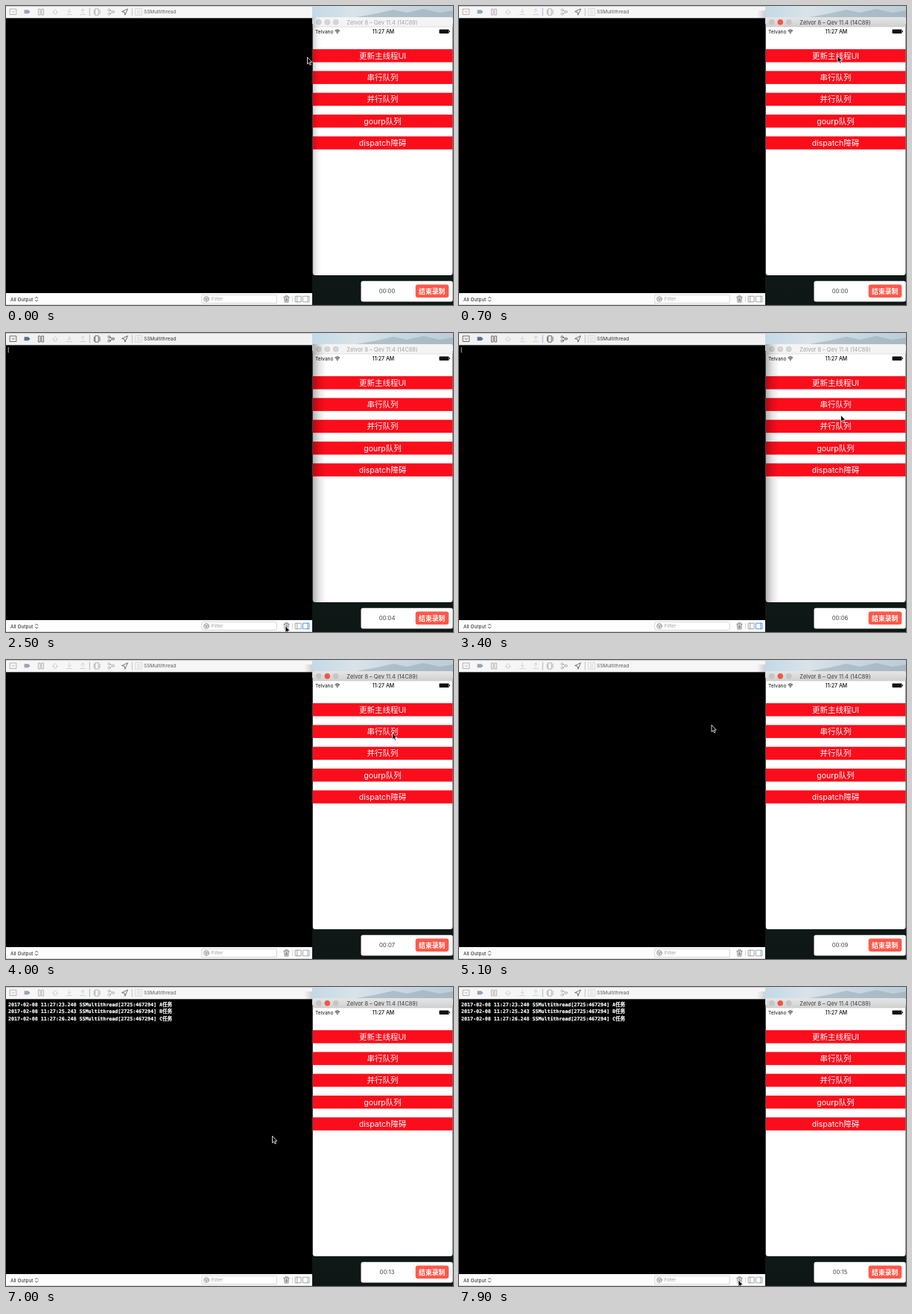
These frames come from a looping animation (600x402 px, 8000 ms). An HTML page:

```html
<!DOCTYPE html>
<html lang="zh-CN">
<head>
<meta charset="utf-8">
<title>Serial queue demo</title>
<style>
  html, body { margin: 0; width: 100%; height: 100%; overflow: hidden; background: #000; }
  svg { display: block; width: 600px; height: 402px; font-family: Inter, "Noto Sans CJK SC", "Noto Sans CJK", sans-serif; }
  .mid { text-anchor: middle; }
  .log { font: bold 6.62px "DejaVu Sans Mono", "Noto Sans CJK SC", "Noto Sans CJK", monospace; fill: #fff; stroke: #fff; stroke-width: .2; white-space: pre; }
  .line { fill: none; stroke-width: .8; stroke-linejoin: round; stroke-linecap: round; }
  .faint { stroke: #cbcbcb; }
  .tool { stroke: #a4a4a4; }
  .strong { stroke: #555; }
  .front .tool, .front .strong { stroke: #4c4c4c; }
</style>
</head>
<body>
<svg viewBox="0 0 600 402">
  <defs>
    <linearGradient id="sky">
      <stop offset="0" stop-color="#c3d9e6"/><stop offset=".3" stop-color="#d9e3e8"/>
      <stop offset=".6" stop-color="#c9d8e1"/><stop offset="1" stop-color="#bccdd8"/>
    </linearGradient>
    <linearGradient id="forest" x2="0" y2="1">
      <stop offset="0" stop-color="#17221f"/><stop offset="1" stop-color="#0e1715"/>
    </linearGradient>
    <linearGradient id="bar" x2="0" y2="1">
      <stop offset="0" stop-color="#e6e6e6"/><stop offset="1" stop-color="#d0d0d0"/>
    </linearGradient>
    <linearGradient id="shadeRight">
      <stop offset="0" stop-opacity=".3"/><stop offset=".5" stop-opacity=".1"/><stop offset="1" stop-opacity="0"/>
    </linearGradient>
    <linearGradient id="shadeLeft">
      <stop offset="0" stop-opacity="0"/><stop offset="1" stop-opacity=".16"/>
    </linearGradient>
  </defs>

  <!-- desktop -->
  <rect width="600" height="402" fill="url(#forest)"/>
  <rect x="411" width="189" height="24" fill="url(#sky)"/>
  <path d="M470 15L498 10 520 5 538 9 560 4 582 9 600 6V15Z" fill="#93a6b0" opacity=".5"/>

  <!-- phone window -->
  <g>
    <path d="M411.800 358.500V18.500q0-3.500 3.500-3.500H596q3.500 0 3.500 3.500V358.500q0 3.500-3.500 3.500H415.300q-3.500 0-3.500-3.500Z" fill="#fff"/>
    <path id="titleBar" d="M411.800 28V18.500q0-3.500 3.500-3.500H596q3.500 0 3.500 3.500V28Z"/>
    <path d="M411.800 28H599.500" stroke="#c2c2c2" stroke-width=".5"/>
    <g id="lights"></g>
    <text id="title" class="mid" x="505" y="24.700" font-size="7.400">Zelvor 8 – Qev 11.4 (14C89)</text>
    <text x="415" y="36.800" font-size="6.600" fill="#111">Telvano</text>
    <g fill="none" stroke="#111" stroke-width="1">
      <path d="M441.500 33.400q3.300-2.900 6.600 0M442.800 34.900q2-1.700 4 0"/>
      <circle cx="444.800" cy="36.200" r=".4"/>
    </g>
    <text class="mid" x="506.500" y="36.900" font-size="7" font-weight="500" fill="#111">11:27 AM</text>
    <rect x="581.500" y="31.500" width="13" height="5.400" rx="1" fill="#111"/>
    <rect x="595" y="33.200" width="1" height="2" fill="#111"/>
    <g id="buttons"></g>
    <rect id="editorShade" x="411.800" y="15" height="347" fill="url(#shadeRight)"/>
  </g>

  <!-- editor window -->
  <g id="editor">
    <rect width="411" height="402" fill="#000"/>
    <rect id="toolbar" width="411" height="16.400"/>
    <path d="M0 .4H411" stroke="#bdbdbd" stroke-width=".8"/>
    <path d="M0 16.800H411" stroke="#24322f" stroke-width=".8"/>
    <g class="line">
      <path class="tool" d="M5.500 4H13.800V11.500H5.500ZM8 7l1.700 1.700L11.400 7"/>
      <path id="tag" d="M24.500 5.300h5.500l2.500 2.500-2.500 2.500h-5.500Z"/>
      <path class="tool" d="M43.800 4h2.200v8h-2.200ZM48.200 4h2.200v8h-2.200Z"/>
      <g class="faint">
        <path d="M62.500 8.500l3.500-4 3.500 4h-2v2.500h-3v-2.500Z"/>
        <path d="M85 4v5M82.800 7L85 9.200 87.200 7M81.500 11.500h7"/>
        <path d="M103 9.200v-5M100.800 6.200L103 4l2.200 2.200M99.500 11.500h7"/>
      </g>
      <path d="M112.300 3V13" stroke="#9aa9bd"/>
      <path class="tool" d="M120 3.800h4.200v8.400H120ZM118.300 5.300v5.400M126 5.300v5.400"/>
      <g class="tool">
        <circle cx="138.400" cy="5.400" r="1.500"/><circle cx="143.800" cy="7.800" r="1.500"/><circle cx="138.400" cy="10.600" r="1.500"/>
        <path d="M139.800 6l2.600 1.200M139.800 10l2.600-1.400"/>
      </g>
      <path class="strong" d="M163 4l-7.500 3.600 3.500.7.700 3.500Z"/>
      <path d="M169.300 3V13" stroke="#b4b4b4"/>
      <path d="M173.800 3.500h8.600v8.800h-8.600ZM176 6h4M176 8h4M176 10h4" stroke="#d2d2d2"/>
    </g>
    <text id="project" x="185" y="10.200" font-size="6.500">SSMultithread</text>

    <g id="logs"></g>
    <path id="caret" d="M3.200 19V26.500" stroke="#ddd" stroke-width=".8"/>

    <rect y="386" width="411" height="16" fill="#fdfdfd"/>
    <path d="M0 401.600H411" stroke="#c9c9c9" stroke-width=".8"/>
    <text x="6" y="396.600" font-size="6.500" fill="#222">All Output</text>
    <path class="line" d="M39.300 393l1.700-1.800 1.700 1.800M39.300 395.400l1.700 1.800 1.700-1.800" stroke="#333"/>
    <rect id="filter" x="262.800" y="388.300" width="100.500" height="11.200" fill="#fff" stroke="#c4c4c4" stroke-width=".7"/>
    <g class="line" stroke="#777">
      <circle cx="269" cy="394" r="3.400"/><path d="M267.200 393h3.600M267.800 394.300h2.400M268.500 395.600h1"/>
    </g>
    <text x="275.800" y="396.400" font-size="6.600" fill="#a0a0a0">Filter</text>
    <path class="line" d="M372.800 391.200h7.400M375 391v-1.300h3V391M373.500 391.500l.6 6.700h4.800l.6-6.700M375.300 393v3.800M376.500 393v3.800M377.700 393v3.800" stroke="#777"/>
    <path d="M384.500 390V398" stroke="#c4c4c4" stroke-width=".7"/>
    <path class="line" d="M388.600 390.200h7.600v7.600h-7.600ZM390.800 390.200v7.600" stroke="#8a8f93"/>
    <path id="pane" class="line" d="M398.800 390.200h8.200v7.600h-8.200ZM405 390.200v7.600"/>
    <rect id="phoneShade" x="400" y="6" width="11" height="10.400" fill="url(#shadeLeft)"/>
  </g>

  <!-- recorder -->
  <rect x="476.500" y="369.800" width="123.200" height="27.700" rx="2.500" fill="#fff"/>
  <text id="clock" class="mid" x="511.500" y="386.200" font-size="7.700" fill="#444"></text>
  <rect x="549.700" y="374.600" width="44.600" height="17.500" rx="3" fill="#ff584a"/>
  <text class="mid" x="571.700" y="386.600" font-size="8.800" font-weight="bold" fill="#fff">结束录制</text>

  <path id="cursor" d="M0 0V9.200L2.100 7.300 3.500 10.500 5 9.800 3.600 6.700H6.300Z" fill="#000" stroke="#fff" stroke-width=".8" stroke-linejoin="round"/>
</svg>
<script>
const LOOP = 8;
const $ = id => document.getElementById(id);
const set = (id, attrs) => {
  for (const key in attrs) $(id).setAttribute(key, attrs[key]);
};

// Times in seconds
const PHONE_FRONT = [0.7, 3.7];
const EDITOR_FRONT = 2.3;

const logs = [
  { from: 0.75, to: EDITOR_FRONT, row: 0, text: '14.088 SSMultithread[2725:467142] 更新主线程UI' },
  { from: 5.35, to: LOOP, row: 0, text: '23.240 SSMultithread[2725:467294] A任务' },
  { from: 6.35, to: LOOP, row: 1, text: '25.243 SSMultithread[2725:467294] B任务' },
  { from: 6.85, to: LOOP, row: 2, text: '26.248 SSMultithread[2725:467294] C任务' }
];

// time, x, y of the pointer tip
const path = [
  [0, 404.5, 68.8], [0.5, 508, 67], [0.9, 508, 67], [1.45, 351.7, 169.3], [1.7, 351.7, 169.3],
  [2.2, 375, 393.8], [2.7, 375, 393.8], [3.5, 518.5, 97.8], [4.2, 518.5, 97.8],
  [5.1, 339, 87.3], [6.1, 339, 87.3], [6.8, 357.5, 200.4], [7.05, 357.5, 200.4], [7.6, 375, 393.8], [LOOP, 375, 393.8]
];

$('buttons').innerHTML = ['更新主线程UI', '串行队列', '并行队列', 'gourp队列', 'dispatch障碍'].map((label, i) => {
  const y = 58.1 + 29.3 * i;
  return `<rect x="411.8" y="${y}" width="187.7" height="17.5" fill="#fc0d1b"/>
    <text class="mid" x="505.500" y="${y + 12.6}" font-size="10.500" fill="#fff">${label}</text>`;
}).join('');

$('lights').innerHTML = [419.8, 431.3, 442.7].map(x => `<circle cx="${x}" cy="21.700" r="3.500" stroke-width=".5"/>`).join('');

$('logs').innerHTML = logs.map(({ row, text }) =>
  `<text class="log" x="3" y="${25.6 + 9.5 * row}">2017-02-08 11:27:${text}</text>`).join('');

function pointerAt(t) {
  const i = path.findIndex((p, n) => n > 0 && t <= p[0]);
  const [t0, x0, y0] = path[i - 1], [t1, x1, y1] = path[i];
  const u = (t - t0) / (t1 - t0), k = u * u * (3 - 2 * u);
  return [x0 + (x1 - x0) * k, y0 + (y1 - y0) * k];
}

function draw(t) {
  const editor = t >= EDITOR_FRONT && t < PHONE_FRONT[1];
  const phone = t >= PHONE_FRONT[0] && !editor;

  set('titleBar', { fill: phone ? 'url(#bar)' : '#f4f4f4' });
  set('title', { fill: phone ? '#3c3c3c' : '#a2a2a2' });
  [...$('lights').children].forEach((light, i) => {
    const lit = phone && i === 1;
    light.setAttribute('fill', lit ? '#fb5344' : phone ? '#c6c6c6' : '#d6d6d6');
    light.setAttribute('stroke', lit ? '#e0443a' : '#bcbcbc');
  });
  set('editorShade', { width: editor ? 18 : 11, opacity: phone ? 0 : editor ? 1 : 0.6 });
  set('phoneShade', { opacity: phone ? 1 : 0 });

  $('editor').classList.toggle('front', editor);
  set('toolbar', { fill: editor ? '#f1f1f1' : '#f6f6f6' });
  set('tag', { fill: editor ? '#5c6f8c' : '#98a5b8' });
  set('project', { fill: editor ? '#333' : '#5c5c5c' });
  set('filter', { rx: editor ? 2.5 : 0.5 });
  set('pane', { stroke: editor ? '#2f7cf0' : '#8d9ba3' });
  set('caret', { opacity: editor ? 1 : 0 });

  logs.forEach(({ from, to }, i) => {
    $('logs').children[i].setAttribute('opacity', t >= from && t < to ? 1 : 0);
  });

  const seconds = Math.max(0, Math.floor(2 * t - 0.5));
  $('clock').textContent = '00:' + String(seconds).padStart(2, '0');
  set('cursor', { transform: `translate(${pointerAt(t)})` });
}

const start = performance.now();
function tick() {
  draw((performance.now() - start) / 1000 % LOOP);
  requestAnimationFrame(tick);
}
tick();
</script>
</body>
</html>
```
